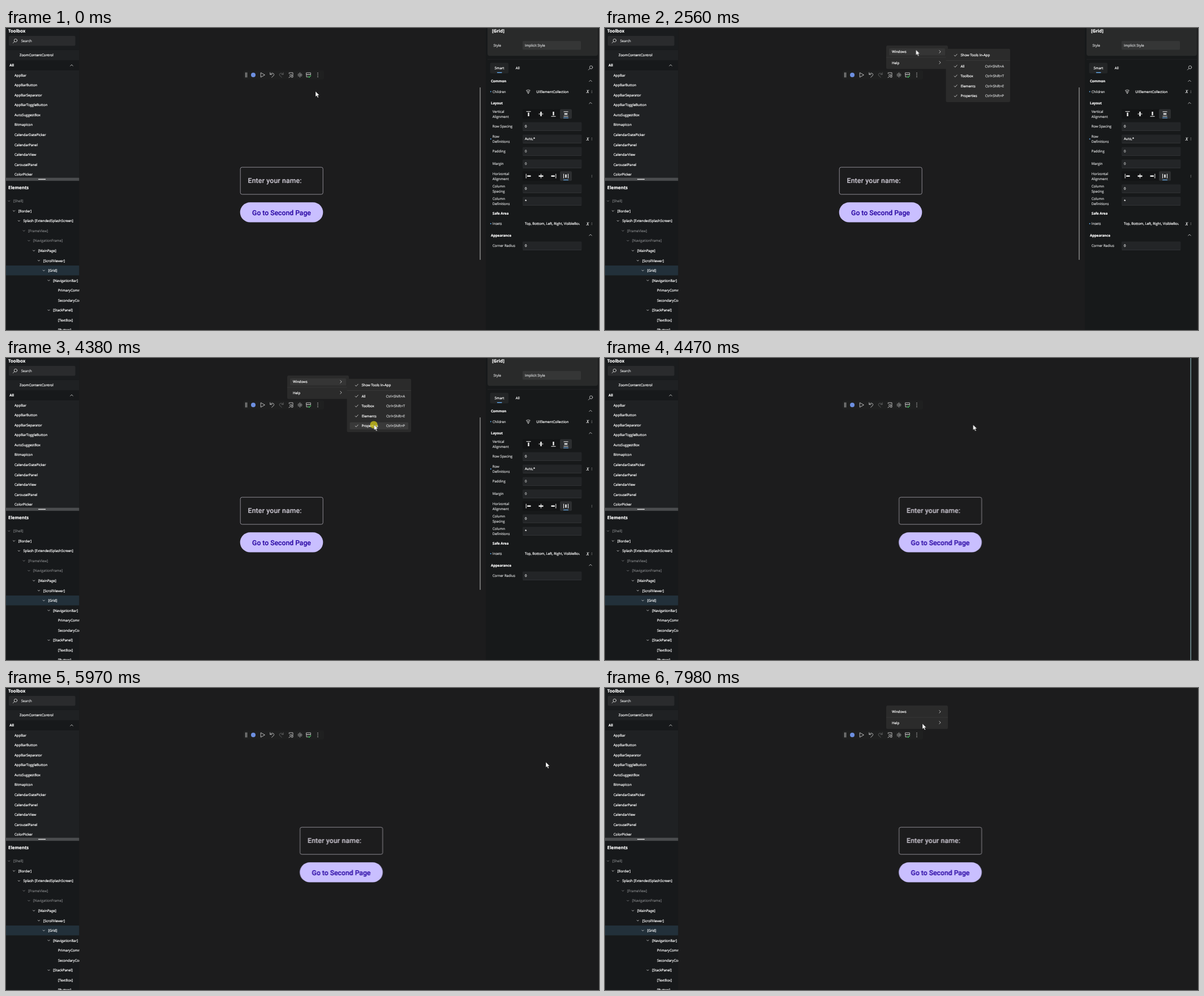
An HTML page for the animation above (8000 ms loop, 1048 by 534 pixels).

```html
<!DOCTYPE html>
<html lang="en">
<head>
<meta charset="utf-8">
<title>Designer panels</title>
<style>
html, body { margin: 0; width: 100%; height: 100%; overflow: hidden; background: #1c1c1d; }
svg { display: block; }
text {
  --ink: #fff;
  font: 500 6.05px "Open Sans", sans-serif;
  fill: var(--ink); stroke: var(--ink); stroke-width: .2px;
  white-space: pre; text-rendering: geometricPrecision;
}
.bold { font-weight: 700; }
.title { font-weight: 700; font-size: 7.85px; }
.dim { --ink: #77797b; }
.soft { --ink: #d2d3d4; }
.mid { text-anchor: middle; }
.end { text-anchor: end; }
.formula { font: italic 8px "Liberation Serif", serif; }
.form text { font: 500 12.2px Roboto, sans-serif; }
.line { fill: none; stroke: #dedede; stroke-width: .8; stroke-linecap: round; stroke-linejoin: round; }

.panel, .form, .edge, .menu, .sub, .top-hover, .row-hover, .click { animation: 8s step-end infinite; }
.cursor { animation: move 8s infinite; }
.panel { animation-name: panel; }
.form { animation-name: form; }
.edge { animation-name: edge; }
.menu { animation-name: menu; }
.sub { animation-name: sub; }
.top-hover { animation-name: top-hover; }
.row-hover { animation-name: row-hover; }
.click { animation-name: click; }

@keyframes panel { 0% { opacity: 1 } 55.875%, 100% { opacity: 0 } }
@keyframes form { 0% { transform: none } 55.875%, 100% { transform: translateX(105.5px) } }
@keyframes edge { 0% { opacity: 0 } 55.875% { opacity: 1 } 56.875%, 100% { opacity: 0 } }
@keyframes menu { 0% { opacity: 0 } 19.25% { opacity: 1 } 55.875% { opacity: 0 } 93.75%, 100% { opacity: 1 } }
@keyframes sub { 0% { opacity: 0 } 32% { opacity: 1 } 55.875%, 100% { opacity: 0 } }
@keyframes top-hover { 0% { opacity: 0 } 27% { opacity: 1 } 55.875%, 100% { opacity: 0 } }
@keyframes row-hover {
  0% { opacity: 0; transform: translateY(48px) }
  38.96% { opacity: 1; transform: translateY(48px) }
  42.84% { opacity: 1; transform: translateY(67.5px) }
  44.78% { opacity: 1; transform: translateY(85px) }
  48.78% { opacity: 1; transform: translateY(102.5px) }
  51.875% { opacity: 1; transform: translateY(120px) }
  55.875%, 100% { opacity: 0; transform: translateY(120px) }
}
@keyframes click {
  0% { opacity: 0; transform: translate(549px, 82px) }
  18.125% { opacity: 1; transform: translate(549px, 82px) }
  19.25% { opacity: 0; transform: translate(549px, 82px) }
  54.75% { opacity: 1; transform: translate(650px, 118px) }
  55.875% { opacity: 0; transform: translate(650px, 118px) }
  92.75% { opacity: 1; transform: translate(552.5px, 83px) }
  93.75%, 100% { opacity: 0; transform: translate(552.5px, 83px) }
}
@keyframes move {
  0% { transform: translate(547px, 112px) }
  9.375% { transform: translate(547px, 112px); animation-timing-function: steps(6, jump-start) }
  15.225% { transform: translate(549.5px, 82px) }
  25% { transform: translate(549.5px, 82px); animation-timing-function: steps(3, jump-start) }
  28% { transform: translate(549.5px, 38.5px) }
  36.875% { transform: translate(549.5px, 38.5px); animation-timing-function: steps(4, jump-start) }
  41.04% { transform: translate(656px, 47px) }
  41.875% { transform: translate(656px, 47px); animation-timing-function: steps(5, jump-start) }
  46.72% { transform: translate(650.5px, 84px) }
  47.75% { transform: translate(650.5px, 84px); animation-timing-function: steps(5, jump-start) }
  52.9% { transform: translate(650.5px, 118px) }
  59.625% { transform: translate(650.5px, 118px); animation-timing-function: steps(5, jump-start) }
  64.625% { transform: translate(985px, 45px); animation-timing-function: steps(2, jump-start) }
  66.625% { transform: translate(1000px, 75px); animation-timing-function: steps(4, jump-start) }
  70.625% { transform: translate(957px, 137px); animation-timing-function: steps(5, jump-start) }
  75.625% { transform: translate(954px, 131px); animation-timing-function: steps(6, jump-start) }
  81.375% { transform: translate(650px, 68px); animation-timing-function: steps(10, jump-start) }
  91.25% { transform: translate(553px, 83px) }
  99.75% { transform: translate(553px, 83px); animation-timing-function: step-start }
  100% { transform: translate(561px, 63px) }
}
</style>
</head>
<body>
<svg width="1048" height="534" viewBox="0 0 1048 534">
  <defs>
    <clipPath id="left-clip"><path d="M0 0H129.5V534H0z"/></clipPath>
    <clipPath id="inset-clip"><path d="M913 336H1014V356H913z"/></clipPath>
  </defs>
  <rect width="1048" height="534" fill="#1c1c1d"/>

  <g id="left" clip-path="url(#left-clip)"></g>

  <g class="form">
    <rect x="414.2" y="246.2" width="146" height="47.9" rx="3" fill="none" stroke="#8e8c93"/>
    <text x="427.6" y="274.4" style="--ink:#c8c4ce;letter-spacing:.18px">Enter your name:</text>
    <rect x="413.7" y="308.3" width="146.6" height="35.2" rx="17.6" fill="#c9bfff"/>
    <text class="mid" x="487" y="330.6" style="--ink:#2c0aa5">Go to Second Page</text>
  </g>

  <g>
    <rect x="420" y="75" width="142" height="16" rx="2" fill="#1f2020"/>
    <path class="line" d="M423.4 79v8M425.6 79v8"/>
    <circle cx="437" cy="83" r="4" fill="#6d8fe0"/>
    <path class="line" d="M450.6 79.2L457.4 83L450.6 86.8z"/>
    <path class="line" d="M466.8 78.8v3.4h3.4M467 82c1.8-3 6.6-2.8 6.6.6 0 1.8-2.4 3-4 4.6"/>
    <path class="line" opacity=".38" d="M490 78.8v3.4h-3.4M489.8 82c-1.8-3-6.6-2.8-6.6.6 0 1.8 2.4 3 4 4.6"/>
    <path class="line" d="M501.6 79h5.4v8h-3M500.4 81v-2M502 86.6l-2 .9"/>
    <circle class="line" cx="503.6" cy="83.8" r="1.8"/>
    <circle class="line" cx="519.5" cy="83" r="1.9"/>
    <g id="rays"></g>
    <path class="line" d="M531 79.2h7.4v3.2H531zM533.4 86.6H531v-4.2h7.4"/>
    <path class="line" style="stroke:#4ccf68;stroke-width:1.2" d="M534.2 85.8l1.5 1.5 3-3.2"/>
    <g id="more"></g>
  </g>

  <g id="right" class="panel"></g>
  <rect class="edge" x="1034.6" width="1.2" height="534" fill="#8fb3b8"/>

  <g class="menu">
    <rect x="497" y="31" width="109" height="41.6" rx="2.5" fill="#2b2b2b"/>
    <rect class="top-hover" x="502" y="36" width="99" height="12.6" rx="1.5" fill="#353535"/>
    <path d="M497 51.9h109" stroke="#3b3b3b" stroke-width=".8"/>
    <g id="menu-items"></g>
  </g>
  <g class="sub">
    <rect x="602.5" y="36.8" width="113.5" height="94.2" rx="2.5" fill="#2b2b2b"/>
    <rect class="row-hover" x="607.5" y="-6.2" width="103.5" height="12.4" rx="1.5" fill="#393939"/>
    <path d="M602.5 57.6H716" stroke="#3d3d3d" stroke-width=".8"/>
    <g id="sub-items"></g>
  </g>

  <circle class="click" r="6.6" fill="#d6cb14" opacity="0" fill-opacity=".72"/>
  <path class="cursor" d="M0 0V9.6L2.2 7.6L3.8 11.2L5.4 10.5L3.8 7H6.8z" fill="#fff" stroke="#111" stroke-width=".4"/>
</svg>
<script>
const fill = (id, parts) => { document.getElementById(id).innerHTML = parts.join(''); };
// y is the middle of the capitals
const label = (x, y, str, cls = '') =>
  `<text x="${x}" y="${y + (cls.includes('title') ? 2.8 : 2.2)}" class="${cls}">${str}</text>`;
const box = (x, y, w, h, color, r = 0) =>
  `<rect x="${x}" y="${y}" width="${w}" height="${h}" rx="${r}" fill="${color}"/>`;
const stroke = (d, style = '') => `<path class="line" d="${d}" style="${style}"/>`;
const up = (x, y) => stroke(`M${x - 2.3} ${y + 1.1}l2.3-2.3 2.3 2.3`);
const down = (x, y, color) => stroke(`M${x - 1.6} ${y - .8}l1.6 1.6 1.6-1.6`, `stroke:${color}`);
const next = (x, y) => stroke(`M${x - 1.2} ${y - 2.3}l2.3 2.3-2.3 2.3`);
const dots = (x, y, gap, r, color) => [-gap, 0, gap].map(d =>
  `<circle cx="${x}" cy="${y + d}" r="${r}" fill="${color}"/>`).join('');
const lens = (x, y) =>
  `<circle class="line" cx="${x + 1}" cy="${y - 1}" r="2.7"/>` + stroke(`M${x - 1} ${y + 1}l-2.6 2.6`);
const blue = '#62a6e4';
const step = 17.55;

// Toolbox and element tree
const tools = ['AppBar', 'AppBarButton', 'AppBarSeparator', 'AppBarToggleButton', 'AutoSuggestBox',
  'BitmapIcon', 'CalendarDatePicker', 'CalendarPanel', 'CalendarView', 'CarouselPanel', 'ColorPicker'];
// [depth, name, is leaf, is dim]
const tree = [[0, '[Shell]', 0, 1], [1, '[Border]'], [2, 'Splash [ExtendedSplashScreen]'],
  [3, '[FrameView]', 0, 1], [4, '[NavigationFrame]', 0, 1], [5, '[MainPage]'], [6, '[ScrollViewer]'],
  [7, '[Grid]'], [8, '[NavigationBar]'], [9, 'PrimaryCommands', 1], [9, 'SecondaryCommands', 1],
  [8, '[StackPanel]'], [9, '[TextBox]', 1], [9, '[Button]', 1]];
fill('left', [
  box(0, 0, 129.5, 534, '#17191b'),
  box(0, 0, 129.5, 38, '#1a1c1e'),
  box(0, 39, 129.5, 18, '#1f2123'),
  box(0, 75, 129.5, 190, '#1f2123'),
  label(4, 5.3, 'Toolbox', 'title'),
  box(5, 14, 117.5, 17.5, '#2a2b2d', 2),
  lens(16, 23), label(26.8, 23, 'Search', 'soft'),
  label(24, 48.2, 'ZoomContentControl'),
  label(6.3, 66, 'All', 'bold'), up(116, 66),
  ...tools.map((s, i) => label(15, 83.5 + i * step, s)),
  box(0, 264.8, 129.5, 5.4, '#4a4c4e'), box(57, 266.9, 13, 1.2, '#f0f0f0'),
  label(4, 282.6, 'Elements', 'title'),
  box(0, 420, 129.5, 17.4, '#22303a'),
  ...tree.map(([depth, s, leaf, dim], i) => {
    const x = 13 + depth * 8.78, y = 306 + i * step;
    return label(x, y, s, dim ? 'dim' : '') + (leaf ? '' : down(x - 7.7, y, dim ? '#85878a' : '#dedede'));
  })
]);

// Properties
const section = (x, y, s, arrow = true) => label(x, y, s, 'bold') + (arrow ? up(1033, y - .5) : '');
const name = (y, s) => s.split('|').map((line, i, all) =>
  label(859.8, y + (i - (all.length - 1) / 2) * 8.6, line, 'soft')).join('');
const field = (y, s, cls) => box(913, y - 7.4, 104.5, 14.8, '#232527', 1.5) +
  box(913.6, y + 7, 103.3, .4, '#505254') + label(917, y, s, cls);
const marker = y => `<circle cx="856.7" cy="${y}" r="1" fill="${blue}"/>`;
const bound = y => label(1025.6, y + .4, 'X', 'formula') + dots(1035.3, y, 1.8, .55, '#aaa');
// Each icon: guide bars and a solid block, turned for the horizontal row
const alignIcons = [['M-4-4.3H4', 'M0-2.4V4'], ['M-4 0H4', 'M0-4V4'],
  ['M-4 4.3H4', 'M0-4V2.4'], ['M-4-4H4M-4 4H4', 'M-2.8 0H2.8']];
const align = (y, turn) => box(913, y - 8.5, 87, 17, '#131415', 2) + box(979, y - 8.5, 21, 17, '#2c2e30', 2) +
  alignIcons.map(([bars, block], i) => `<g fill="none" stroke="#f0f0f0"
    transform="translate(${923.5 + i * 22} ${y}) rotate(${turn})">
    <path d="${bars}"/><path d="${block}" stroke-width="2.4"/></g>`).join('') +
  box(985, y + 6.2, 9, 1.3, blue, .6);

fill('right', [
  box(837.5, 105, 1, 305, '#bdbdbd', .5),
  box(848, 0, 198, 534, '#17191a'),
  box(851, -6, 195, 55.3, '#292a2a', 4),
  label(859, 5.3, '[Grid]', 'title'),
  label(861.5, 30.6, 'Style', 'soft'),
  box(913, 23, 103, 15.5, '#353636', 1.5), label(917, 30.6, 'Implicit Style', 'soft'),
  box(851, 55, 195, .8, '#222426'),
  box(855.5, 61.5, 32.5, 18.8, '#232526', 2), label(872, 70.8, 'Smart', 'mid'),
  box(867.8, 78, 8.8, 1.4, blue, .6), label(904.3, 70.8, 'All', 'mid'), lens(1033, 70.5),
  section(857, 94, 'Common'),
  marker(112.6), name(112.6, 'Children'),
  stroke('M919.6 110.4l3.4-1.4 3.4 1.4-3.4 1.6zM920.6 112.4l2.4 3.6 2.4-3.6M923 112v4', 'stroke-width:.7'),
  label(937.3, 112.6, 'UIElementCollection'), bound(112.6),
  section(857, 133.2, 'Layout'),
  name(152.4, 'Vertical|Alignment'), align(152, 0),
  name(174, 'Row Spacing'), field(174, '0'),
  marker(196.2), name(196.2, 'Row|Definitions'), field(196, 'Auto,*'), bound(196.2),
  name(218, 'Padding'), field(218, '0', 'soft'),
  name(240, 'Margin'), field(240, '0', 'soft'),
  name(262.2, 'Horizontal|Alignment'), align(261.8, -90), dots(1035.3, 262, 1.8, .55, '#aaa'),
  name(284.1, 'Column|Spacing'), field(284, '0'),
  name(306.1, 'Column|Definitions'), field(306, '*'),
  section(859.8, 328.2, 'Safe Area', false),
  marker(346), name(346, 'Insets'),
  `<g clip-path="url(#inset-clip)">${label(917, 346, 'Top, Bottom, Left, Right, VisibleBounds')}</g>`, bound(346),
  section(857, 366.6, 'Appearance'),
  name(385.2, 'Corner Radius'), field(385, '0')
]);

// Floating toolbar and menus
fill('rays', Array.from({ length: 8 }, (_, i) =>
  `<path class="line" d="M0-3.4v-.6" transform="translate(519.5 83) rotate(${i * 45})"/>`));
fill('more', [dots(551, 83, 3.2, .75, '#e6e6e6')]);
fill('menu-items', [['Windows', 42.2], ['Help', 61.4]].map(([s, y]) => label(507, y, s) + next(592, y - .3)));
fill('sub-items', [['Show Tools In-App', 48.2], ['All', 67.6, 'A'], ['Toolbox', 85, 'T'],
  ['Elements', 102.6, 'E'], ['Properties', 120.2, 'P']].map(([s, y, key]) =>
  stroke(`M617.2 ${y}l1.6 1.7 3.4-3.7`) + label(628.5, y, s) +
  (key ? label(705, y, 'Ctrl+Shift+' + key, 'soft end') : '')));
</script>
</body>
</html>
```
